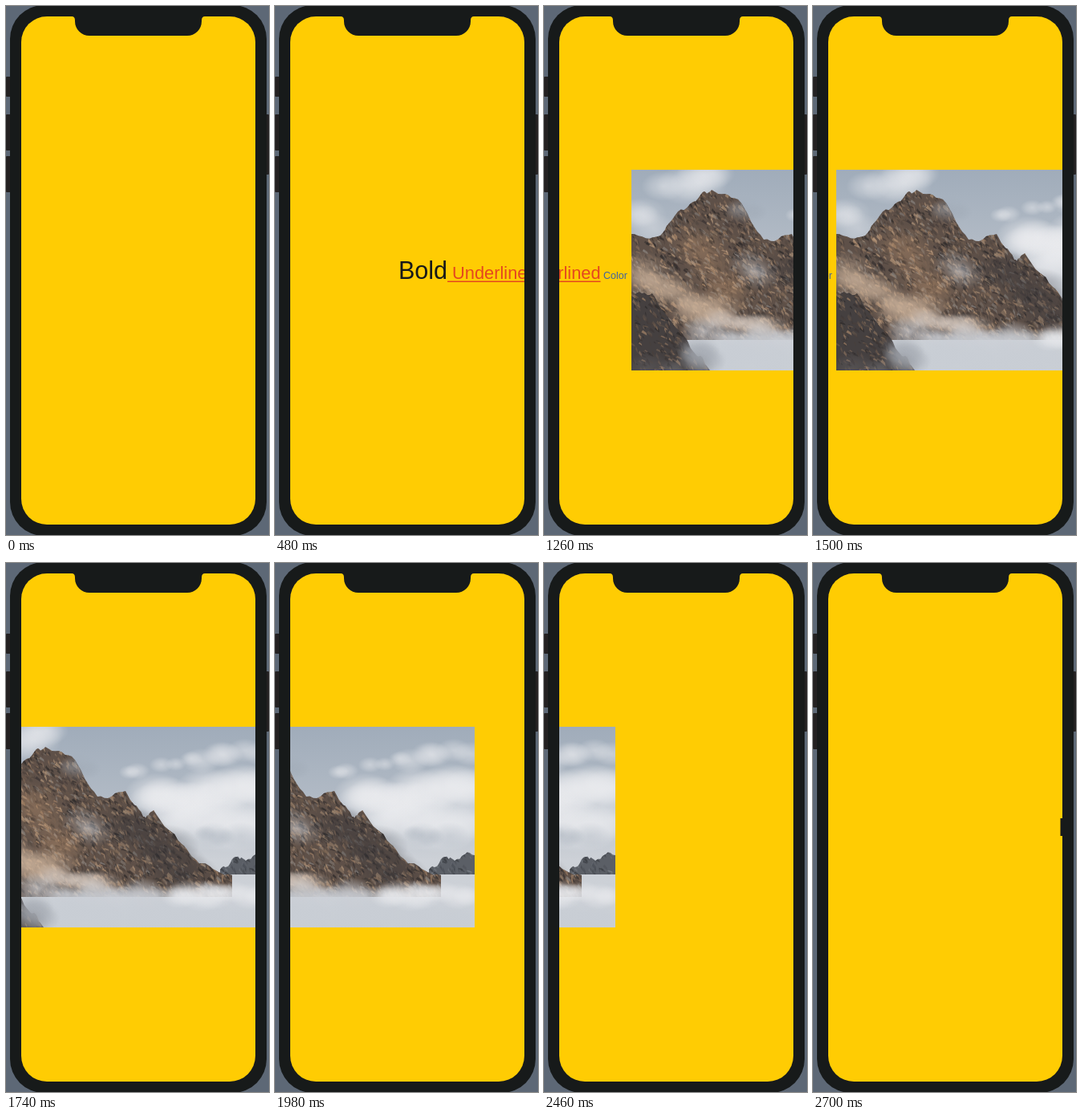
An HTML page with a canvas for the animation above (2760 ms loop, 328 by 659 pixels).

```html
<!DOCTYPE html>
<html lang="en">
<head>
<meta charset="utf-8">
<title>Rich text marquee</title>
<style>
  html, body { margin: 0; width: 100%; height: 100%; overflow: hidden; background: #5d6876; }
  canvas { display: block; width: 328px; height: 659px; }
</style>
</head>
<body>
<canvas id="stage" width="328" height="659"></canvas>
<script>
const ctx = document.getElementById('stage').getContext('2d');
const LOOP = 2760, STEP = 60, LAP = 2676;
const BASELINE = 340;
const BODY = '#171a1a', YELLOW = '#ffcc03', BACKDROP = '#5d6876';
const SCREEN = [19, 13, 292, 633, 32];
const PHOTO = { w: 375, h: 250, top: 204, offset: 211 };
const WHITE = '234,235,238', MIST = '208,211,217', SAND = '208,182,158', SLATE = '158,168,180';

// Steady scroll to the left that stutters by a few pixels every 1.2 s.
function marqueeX(t) {
  return Math.floor(314 - t / 3 + 4.5 * Math.floor((t + 600) / 1200));
}

function seeded(seed) {
  return () => (seed = (seed * 16807) % 2147483647) / 2147483647;
}

const random = seeded(41);
const between = (a, b) => a + (b - a) * random();
const mix = (a, b, k) => a + (b - a) * k;

function haze(g, x, y, rx, ry, rgb, alpha) {
  g.save();
  g.translate(x, y);
  g.scale(rx, ry);
  const soft = g.createRadialGradient(0, 0, 0, 0, 0, 1);
  soft.addColorStop(0, `rgba(${rgb},${alpha})`);
  soft.addColorStop(0.5, `rgba(${rgb},${alpha * 0.6})`);
  soft.addColorStop(1, `rgba(${rgb},0)`);
  g.fillStyle = soft;
  g.fillRect(-1, -1, 2, 2);
  g.restore();
}

// Scatters soft puffs along a line.
function bank(g, [x0, y0], [x1, y1], count, size, rgb, alpha) {
  for (let i = 0; i < count; i++) {
    const k = (i + random()) / count, r = size * between(0.6, 1.2);
    haze(g, mix(x0, x1, k), mix(y0, y1, k) + between(-0.4, 0.4) * size, r * 1.5, r, rgb, alpha);
  }
}

// Splits every segment of a ridge at a displaced middle, several times over.
function jagged(points, rough, depth) {
  if (!depth) return points;
  const finer = points.flatMap(([x, y], i) => {
    if (!i) return [[x, y]];
    const [px, py] = points[i - 1];
    return [[(px + x) / 2, (py + y) / 2 + between(-rough, rough)], [x, y]];
  });
  return jagged(finer, rough * 0.6, depth - 1);
}

function rock(g, ridge, bottom, base, tones, count) {
  const line = jagged(ridge, 5, 3);
  const left = ridge[0][0], right = ridge[ridge.length - 1][0];
  g.save();
  g.beginPath();
  line.forEach(([x, y]) => g.lineTo(x, y));
  g.lineTo(right, bottom);
  g.lineTo(left, bottom);
  g.clip();
  g.fillStyle = base;
  g.fillRect(left, 0, right - left, bottom);
  for (let i = 0; i < count; i++) {
    const x = between(left, right), y = between(20, bottom);
    const w = between(1, 5), h = between(3, 10);
    g.globalAlpha = between(0.3, 0.75);
    g.fillStyle = tones[Math.floor(random() * tones.length)];
    g.beginPath();
    g.moveTo(x, y);
    g.lineTo(x + w, y + h * 0.5);
    g.lineTo(x + w * 1.2, y + h);
    g.lineTo(x - w * 0.4, y + h * 0.4);
    g.fill();
  }
  g.restore();
}

function paintPhoto() {
  const photo = document.createElement('canvas');
  photo.width = PHOTO.w;
  photo.height = PHOTO.h;
  const g = photo.getContext('2d');
  const sky = g.createLinearGradient(0, 0, 0, PHOTO.h);
  ['#a0acba', '#b0b9c4', '#cdd1d7', '#cacfd5'].forEach((c, i) => sky.addColorStop(i / 3, c));
  g.fillStyle = sky;
  g.fillRect(0, 0, PHOTO.w, PHOTO.h);

  bank(g, [40, 12], [115, 10], 5, 22, WHITE, 0.5);
  bank(g, [0, 55], [30, 70], 4, 20, WHITE, 0.35);
  bank(g, [190, 56], [375, 28], 10, 14, WHITE, 0.5);
  bank(g, [225, 92], [375, 78], 12, 26, WHITE, 0.75);
  bank(g, [240, 120], [375, 125], 10, 32, WHITE, 0.5);
  bank(g, [280, 140], [360, 130], 4, 15, SLATE, 0.3);

  rock(g, [[318, 178], [335, 163], [350, 167], [375, 160]], 184,
    '#5b5f66', ['#34373c', '#44484f', '#81868d'], 300);
  const browns = ['#2b2828', '#3a3332', '#4a403b', '#6b594c', '#a58468', '#b99a7d', '#86807c'];
  rock(g, [[0, 80], [36, 82], [58, 52], [88, 29], [100, 25], [133, 37], [165, 87], [200, 80],
    [222, 112], [235, 104], [270, 146], [295, 170], [333, 185]], 212, '#5e5048', browns, 4200);

  // Cool shade on the far slopes, warm light on the near face.
  bank(g, [200, 115], [285, 185], 6, 26, '50,50,55', 0.3);
  bank(g, [70, 75], [130, 165], 6, 24, '190,148,112', 0.22);
  bank(g, [125, 40], [155, 60], 3, 18, SLATE, 0.3);
  bank(g, [145, 120], [165, 135], 3, 16, MIST, 0.3);

  bank(g, [0, 130], [110, 180], 9, 22, SAND, 0.55);
  bank(g, [100, 188], [180, 200], 7, 17, '218,205,195', 0.6);
  bank(g, [90, 206], [375, 214], 18, 18, MIST, 0.7);
  bank(g, [80, 232], [375, 235], 18, 28, '200,205,212', 0.6);
  bank(g, [260, 205], [375, 212], 8, 18, WHITE, 0.6);

  rock(g, [[0, 157], [26, 154], [60, 200], [82, 232], [98, 250]], 250, '#454040', browns.slice(0, 5), 900);
  bank(g, [80, 215], [92, 245], 5, 22, '165,170,178', 0.5);
  bank(g, [20, 248], [80, 245], 4, 18, '120,120,124', 0.3);
  return photo;
}

const photo = paintPhoto();

function word(text, size, color, x) {
  ctx.font = `${size}px "Liberation Sans", Arial, sans-serif`;
  ctx.fillStyle = color;
  ctx.fillText(text, x, BASELINE);
  return x + ctx.measureText(text).width;
}

function drawMarquee(x) {
  const start = word('Bold', 30.5, '#17191a', x);
  const end = word(' Underlined', 21.8, '#e4471f', start);
  ctx.fillRect(start, 342.5, end - start, 1.5);
  word(' Color', 12.5, '#3d62a0', end);
  ctx.drawImage(photo, x + PHOTO.offset, PHOTO.top);
}

function roundRect(x, y, w, h, r, color) {
  ctx.beginPath();
  ctx.roundRect(x, y, w, h, r);
  ctx.fillStyle = color;
  ctx.fill();
}

function drawPhone() {
  ctx.fillStyle = BACKDROP;
  ctx.fillRect(0, 0, 328, 659);
  [[0, 88, 25], [0, 135, 45], [0, 187, 45], [322, 135, 75]].forEach(([x, y, h]) =>
    roundRect(x, y, 6, h, 1, '#242122'));
  roundRect(5, -1, 320, 661, 42, BODY);
  roundRect(...SCREEN, YELLOW);
}

function drawNotch() {
  const left = 86, right = 244, top = 13, bottom = 37;
  ctx.fillStyle = BODY;
  ctx.beginPath();
  ctx.moveTo(left - 4, top);
  ctx.quadraticCurveTo(left, top, left, top + 5);
  ctx.arcTo(left, bottom, right, bottom, 18);
  ctx.arcTo(right, bottom, right, top, 18);
  ctx.lineTo(right, top + 5);
  ctx.quadraticCurveTo(right, top, right + 4, top);
  ctx.fill();
}

function draw(now) {
  const t = Math.floor((now % LOOP) / STEP) * STEP;
  drawPhone();
  ctx.save();
  ctx.beginPath();
  ctx.roundRect(...SCREEN);
  ctx.clip();
  drawMarquee(marqueeX(t % LAP));
  ctx.restore();
  drawNotch();
  requestAnimationFrame(draw);
}

requestAnimationFrame(draw);
</script>
</body>
</html>
```
